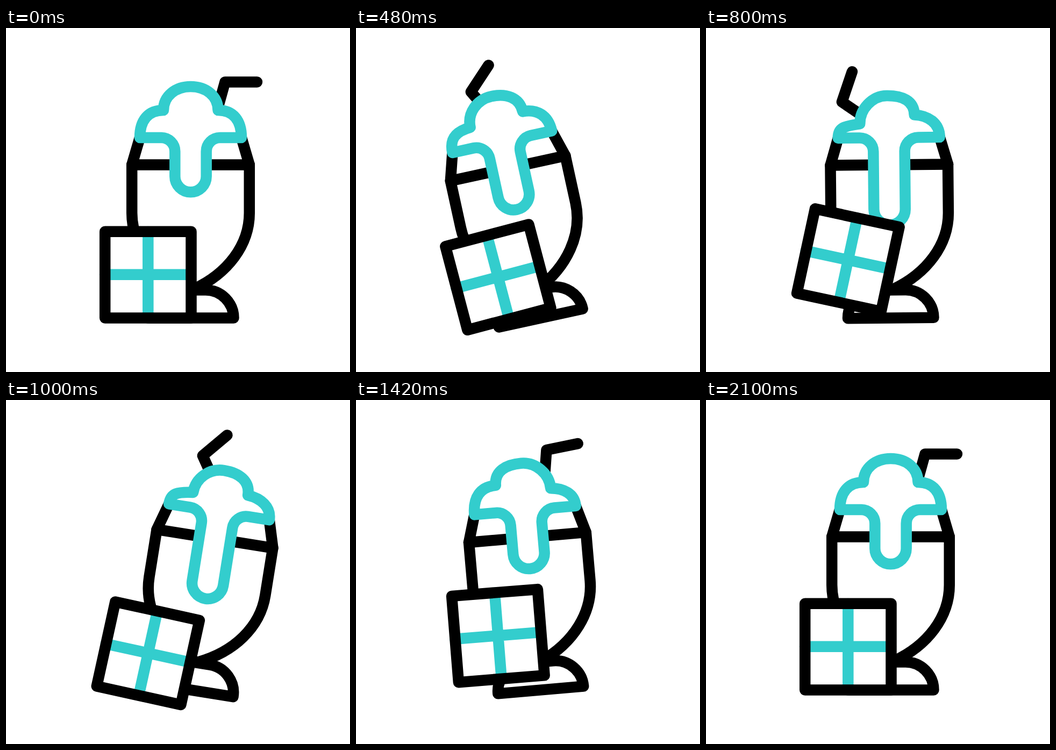
Write an HTML page that moves like this. It is 640 px wide and 640 px high and loops after 2400 ms.

```html
<!DOCTYPE html>
<html lang="en">
<head>
<meta charset="utf-8">
<title>Milkshake and gift</title>
<style>
html, body { margin: 0; height: 100%; overflow: hidden; background: #fff; }
svg { display: block; width: 100vw; height: 100vh; }
g { fill: none; stroke: #000; stroke-width: 20.5; stroke-linecap: round; stroke-linejoin: round; }
.teal { stroke: #33cdcd; }
.white { fill: #fff; }
</style>
</head>
<body>
<svg viewBox="0 0 640 640">
  <g id="glass">
    <path id="straw" d="M467 100.5H407.5L384 185"/>
    <path d="M249 204L234.2 254.5H452.8L438 204"/>
    <path d="M234.2 254.5V344C234.2 404 275 457 338 486H349C412 457 452.8 404 452.8 344V254.5"/>
    <path d="M264 539.5C264 511 287 487.5 316 487.5H371.5C400 487.5 423.5 511 423.5 539.5Z"/>
    <path id="cream" class="teal white"/>
  </g>
  <g id="gift">
    <rect class="white" x="184" y="378.5" width="160.5" height="161" stroke="none"/>
    <path class="teal" d="M264.3 379V539M184 458.8H344"/>
    <rect x="184.2" y="378.7" width="160.3" height="160.8"/>
  </g>
</svg>
<script>
const [glass, straw, cream, gift] = ["glass", "straw", "cream", "gift"].map(id => document.getElementById(id));

function ease(t, from, to) {
  const u = Math.min(1, Math.max(0, (t - from) / (to - from)));
  return u * u * (3 - 2 * u);
}

// Rises from 0 to 1 at the peak, then falls back to 0
const bump = (t, start, peak, end) => ease(t, start, peak) - ease(t, peak, end);

// Overlapping bumps: swings from one peak straight to the next
const sway = (t, turns, peaks) =>
  peaks.reduce((sum, p, i) => sum + p * bump(t, ...turns.slice(i, i + 3)), 0);

// l and r lower the two notches, the dome follows their average
function creamPath(l, r, drip) {
  const dx = -0.13 * l, lx = 293 + dx, rx = 394.5 + dx, top = 109 + (l + r) / 2;
  const ly = 153 + l, ry = 153 + r, end = 276 + drip;
  return `M249 204C249 ${172 + 0.5 * l} ${264 + dx} ${153 + 1.15 * l} ${lx} ${ly}
    C${lx} ${ly - 27} ${316 + dx} ${top} ${343.5 + dx} ${top}
    C${371.5 + dx} ${top} ${rx} ${ry - 27} ${rx} ${ry}
    C${423 + dx - 0.35 * r} ${153 + 1.15 * r} 438 ${172 + 0.6 * r} 438 204
    H398A25.5 25.5 0 0 0 372.7 229.5V${end}A29.2 29.2 0 0 1 314.3 ${end}
    V229.5A25.5 25.5 0 0 0 289 204Z`;
}

function draw(now) {
  const t = now % 2400;
  const tilt = sway(t, [0, 557, 1007, 1456, 1861], [-13, 9.1, -5.2]);
  const bend = -71 * bump(t, 0, 825, 1300) - 20 * bump(t, 1300, 1615, 2100);
  const turn = sway(t, [0, 362, 909, 1304, 1632, 2100], [-19, 15.7, -8.2, 4.3]);
  const hop = sway(t, [0, 320, 755, 1070, 1415, 1735, 2100], [20, -30, 18, -20.5, 20]);
  const left = 25.5 * bump(t, 110, 880, 1480) - 3 * bump(t, 1300, 1700, 2100);
  const right = 14.5 * bump(t, 0, 1370, 2100);
  const drip = 65 * bump(t, 120, 920, 1561);

  glass.setAttribute("transform", `rotate(${tilt} 343.5 539.5)`);
  straw.setAttribute("transform", `rotate(${bend} 357.6 224.6)`);
  cream.setAttribute("d", creamPath(left, right, drip));
  gift.setAttribute("transform", `translate(0 ${hop}) rotate(${turn} 264.3 459)`);
  requestAnimationFrame(draw);
}
draw(0);
</script>
</body>
</html>
```
